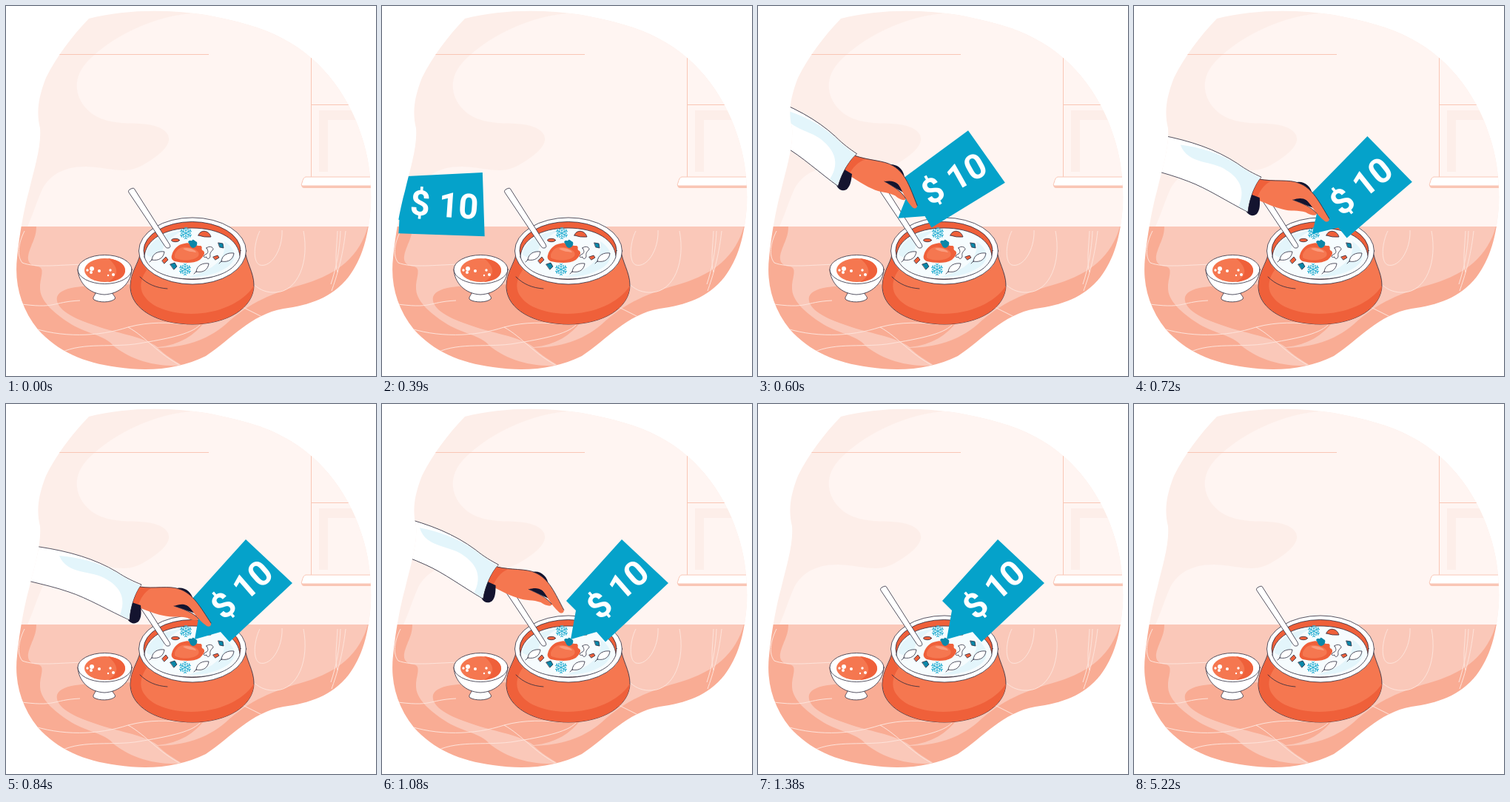
An HTML page that plays this animation: 500x500 px, repeating every 9000 ms.

```html
<!DOCTYPE html>
<html lang="en">
<head>
<meta charset="utf-8">
<title>Soup price tag</title>
<style>
  html, body { margin: 0; width: 100%; height: 100%; overflow: hidden; background: #fff; }
  svg { display: block; width: 100%; height: 100%; }
  .ink { stroke: #2b2a3d; stroke-width: .8; stroke-linejoin: round; stroke-linecap: round; }
  .line { fill: none; stroke: #f9c6b5; }
  .grain { fill: none; stroke: #fde3da; stroke-width: 1; }
  .white { fill: #fff; }
  .red { fill: #ef603a; }
  .orange { fill: #f57750; }
  .teal { fill: #0b87a8; }
  .pale { fill: #e3f5fb; }
  .navy { fill: #14142f; }
  .none { fill: none; }
  text { font: 700 47px Roboto, Arial, sans-serif; fill: #fff; text-anchor: middle; }
</style>
</head>
<body>
<svg viewBox="0 0 500 500">
  <defs>
    <clipPath id="blob">
      <path d="M112 17C160 5 215 4 270 12C310 20 345 28 372 43C430 72 468 128 484 187C492 215 494 245 493 270C490 312 481 342 463 366C440 395 410 404 375 409C330 417 305 450 270 473C235 490 195 495 150 488C105 482 70 467 43 437C20 408 11 375 15 340C18 310 24 275 31 250C38 220 48 190 46 165C41 145 43 125 54 97C68 69 88 42 112 17Z"/>
    </clipPath>
    <g id="dill" fill="none" stroke="#35b3d4" stroke-width="1">
      <path id="sprig" d="M0 0V-8M0-3L-3-6M0-3L3-6M0-6L-2-8M0-6L2-8"/>
      <use href="#sprig" transform="rotate(60)"/>
      <use href="#sprig" transform="rotate(120)"/>
      <use href="#sprig" transform="rotate(180)"/>
      <use href="#sprig" transform="rotate(240)"/>
      <use href="#sprig" transform="rotate(300)"/>
    </g>
    <path id="leaf" class="ink white" d="M-8 5C-7-4 1-7 9-6C8 2 2 7-8 5ZL-11 8"/>
  </defs>

  <g clip-path="url(#blob)">
    <!-- wall -->
    <path fill="#fdeee9" d="M0 0H500V300H0Z"/>
    <path fill="#fff5f2" d="M262 9C195 12 140 45 112 73C90 95 92 120 108 138C127 159 155 158 180 159C206 160 222 169 220 182C217 195 200 206 185 215C160 229 140 218 108 217C76 217 57 230 48 250C40 268 36 283 29 298H500V0Z"/>
    <path class="line" d="M72 65.500H274M412.500 60V231M413 133.500H465"/>
    <path fill="#fdeee9" d="M423 141H480V154H435V224H423Z"/>
    <path fill="#f9c6b5" d="M399 241H500V246H403Q399 246 399 241Z"/>
    <path fill="#fff" stroke="#f9c6b5" d="M405 231H500V243H401Q398 243 400 239Q402 231 405 231Z"/>

    <!-- table -->
    <path fill="#f9ac94" d="M0 298H500V500H0Z"/>
    <path fill="#fac8b9" d="M41 298H489C478 338 448 362 405 375C360 388 330 400 297 430C270 453 240 461 205 462C215 472 228 479 238 486C195 488 165 475 145 459C135 445 105 442 85 428C65 415 45 398 46 380C46 367 54 353 42 352C24 349 30 335 35 322C39 313 41 306 41 298Z"/>
    <path fill="#f9ac94" d="M69 393C75 377 110 378 180 376L270 425C255 445 235 458 205 461C185 446 150 443 115 430C85 420 66 407 69 393Z"/>
    <g class="grain">
      <path d="M25 304C17 320 14 337 22 347C40 354 70 350 105 349"/>
      <path d="M14 402C70 410 60 400 100 398M30 433C75 449 125 447 165 434C195 426 220 428 244 430"/>
      <path d="M75 468C105 454 145 462 180 456C215 450 250 444 262 431M165 434C190 448 205 470 238 487"/>
      <path d="M343 304C335 320 333 346 343 350C358 354 374 330 373 303"/>
      <path d="M402 304C410 345 395 386 364 387C343 388 327 374 322 352"/>
      <path d="M452 304C451 330 446 355 439 376M459 304C455 340 447 365 440 385M300 397L350 422M448 304C447 325 444 345 448 360"/>
    </g>
  </g>

  <!-- sauce bowl -->
  <path class="ink white" d="M122 386C120 392 116 394 119 397C126 401 141 401 147 396C149 393 144 391 143 386Z"/>
  <path class="ink white" d="M97 356C98 374 112 389 133 390C154 389 169 374 170 356Z"/>
  <ellipse class="ink white" cx="133.500" cy="356" rx="36.500" ry="19.500"/>
  <ellipse class="orange" cx="133.500" cy="357" rx="27.500" ry="16"/>
  <path class="red" d="M138 341C154 343 162 350 161 359C160 367 150 372 138 373C155 363 151 352 138 341Z"/>
  <g class="white">
    <circle cx="116" cy="355" r="3"/><circle cx="110" cy="357" r="1.700"/><circle cx="115" cy="360" r="2"/>
    <circle cx="126" cy="358" r="2"/><circle cx="141" cy="357" r="1.700"/><circle cx="145" cy="363" r="2"/><circle cx="138" cy="364" r="1.200"/>
  </g>

  <!-- pot -->
  <path class="ink orange" d="M181 336C179 348 168 360 168 380C169 410 205 430 252 430C299 430 335 408 335 377C335 360 324 345 323 330Z"/>
  <path class="red" d="M181 340C178 350 168 362 168.500 380C170 410 206 430 252 430C299 430 334 408 335 378C318 405 275 420 235 415C205 411 190 400 184 387C180 376 184 365 190 357Z"/>
  <path class="ink none" d="M181 366C191 376 203 381 218 382"/>
  <ellipse class="ink white" cx="252" cy="331" rx="72.500" ry="45"/>
  <ellipse class="ink red" cx="251.500" cy="330.500" rx="65.500" ry="39"/>
  <path class="ink" fill="#f6fcfe" d="M187 339C188 316 214 300 251 300C289 300 315 316 316 339C310 357 286 369 251 369C216 369 192 357 187 339Z"/>
  <path class="pale" d="M190 336C192 318 212 307 240 303C218 314 207 327 213 339C205 341 196 341 190 336ZM295 318C312 329 313 343 299 353C282 364 263 366 246 366C282 357 299 340 295 318Z"/>
  <use href="#dill" x="243" y="307"/>
  <use href="#dill" x="242" y="356"/>
  <use href="#leaf" x="205" y="338"/>
  <use href="#leaf" x="265" y="354"/>
  <use href="#leaf" x="299" y="340"/>
  <g class="ink" stroke-width=".5">
    <ellipse class="red" cx="229" cy="316.500" rx="5.500" ry="2.200"/>
    <path class="red" d="M260 310C262 302 274 302 277 312Q268 313 260 310ZM211 344L216 339L219 343L214 348ZM280 339L286 337L288 340L283 343Z"/>
    <path class="teal" d="M287 320L293 321L294 327L289 326ZM222 349L228 347L231 352L227 356Z"/>
    <path class="white" d="M271 327C274 324 280 325 280 329C277 332 275 334 276 338C275 343 271 342 271 339C266 341 266 337 271 335C274 333 273 330 271 327Z"/>
  </g>
  <path class="red" d="M224 337C226 329 232 322 241 321C248 318 253 324 263 324C267 326 262 329 267 331C270 335 266 339 262 343C252 349 238 347 228 345C224 343 223 340 224 337Z"/>
  <path class="orange" d="M228 336C231 327 239 324 246 326C256 328 263 332 260 338C254 345 234 345 228 340Z"/>
  <path fill="#fa9b7c" d="M239 328C245 325 256 329 257 333C251 332 245 332 239 328Z"/>
  <path class="teal" d="M253 327C248 326 249 322 246 319C248 315 251 319 252 316C254 315 255 318 258 319C259 323 257 326 253 327Z"/>
  <path class="ink white" d="M166 252Q164 249 169 247Q173 245 174 248L221 322Q223 326 220 327Q217 328 215 325Z"/>

  <!-- price tag and hand, drawn in their resting pose -->
  <g clip-path="url(#blob)">
    <g id="tag">
      <path fill="#05a2ca" d="M324 183L387 242L302 321.500L290 308L255 318L262 279L249 266Z"/>
      <text transform="translate(318 250) rotate(-41)" y="17">$ 10</text>
    </g>
    <g id="hand">
      <path class="navy" d="M228 250C238 245 251 252 253 265C247 260 242 257 236 258ZM224 272C234 265 247 270 256 283L244 279Z"/>
      <path class="orange" d="M176 246C200 250 221 245 234 250C253 256 263 275 277 296C278 301 273 302 270 299C259 291 254 281 246 273C239 269 233 271 227 273C239 277 252 281 260 290C260 294 252 293 245 289C235 286 224 289 213 286C197 283 183 275 166 271Z"/>
      <path class="red" d="M176 246C183 248 189 249 196 249C187 254 181 263 178 275L166 271Z"/>
      <path class="ink none" d="M181 247C200 250 221 245 234 250C253 256 263 275 277 296M227 273C239 277 252 281 260 290"/>
      <path class="navy" d="M170 268L182 272C183 282 183 289 179 294C174 298 169 297 165 292Z"/>
      <path class="ink white" d="M-160 150L45 193C85 199 120 209 150 227C162 235 173 240 183 244C175 253 168 273 167 292C140 280 110 262 85 254C68 248 50 244 34 240L-170 195Z"/>
      <path class="pale" d="M72 205C98 207 125 214 150 228C162 236 172 241 182 245C175 254 168 272 166 291L154 285C163 263 154 247 136 237C117 224 83 232 72 205Z"/>
    </g>
  </g>
</svg>
<script>
  const LOOP = 9000, ARRIVE = 840, LEAVE = 900;
  const tag = document.getElementById('tag');
  const hand = document.getElementById('hand');

  // Swings a part back along the arm's path, tau ms away from rest.
  function place(part, tau) {
    const s = (Math.max(0, tau) / 360) ** 2.2;
    const x = 255 - 162 * s;
    const y = 318 - 47 * (1 - Math.exp(-2.7 * s));
    const turn = Math.min(45, 27 * s + 4 * s * s);
    part.setAttribute('transform', `translate(${x} ${y}) rotate(${turn}) translate(-255 -318)`);
  }

  function show(part, on) {
    part.style.display = on ? '' : 'none';
  }

  function draw(now) {
    const t = now % LOOP;
    show(tag, t >= 300 && t < 5220);
    show(hand, t >= 300 && t < 1380);
    place(tag, ARRIVE - t);
    place(hand, t < LEAVE ? ARRIVE - t : (t - LEAVE) * .97);
    requestAnimationFrame(draw);
  }
  draw(0);
</script>
</body>
</html>
```
